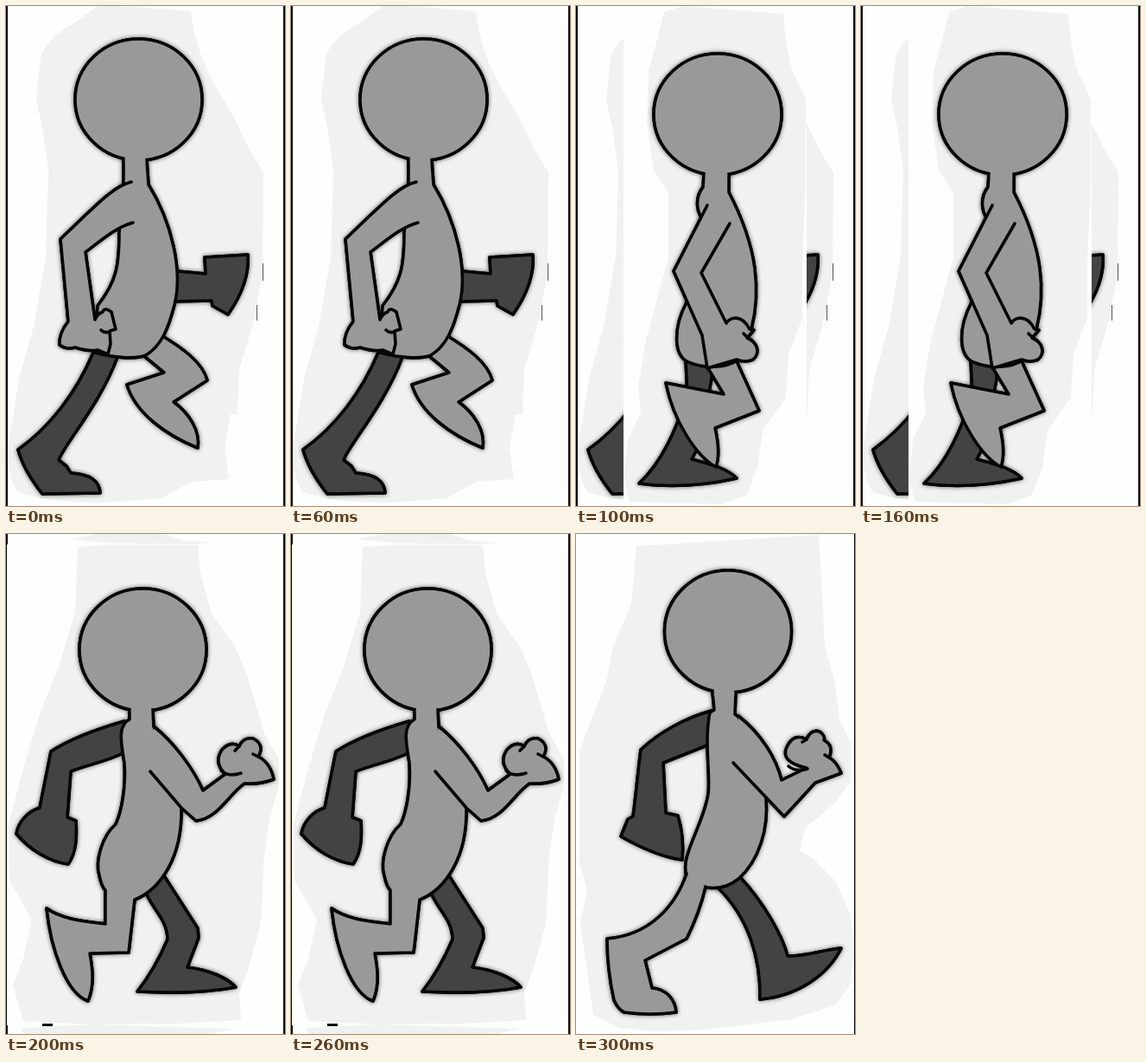
These frames come from a looping animation (323x577 px, 0.4 s). An HTML page with a canvas:

```html
<!DOCTYPE html>
<html lang="en">
<head>
<meta charset="utf-8">
<title>Walk cycle</title>
<style>
  html, body { margin: 0; width: 100%; height: 100%; overflow: hidden; background: #fdfffd; }
  canvas { display: block; width: 323px; height: 577px; }
</style>
</head>
<body>
<canvas id="stage"></canvas>
<script>
const W = 323, H = 577, STEP = 100;
const WHITE = '#fdfffd', PAPER = '#f0f2f0', GREY = '#989a97', DARK = '#424441', INK = '#050505';

const canvas = document.getElementById('stage');
const ctx = canvas.getContext('2d');
const ratio = window.devicePixelRatio || 1;
canvas.width = W * ratio;
canvas.height = H * ratio;
ctx.scale(ratio, ratio);

const part = (color, d) => ({ color, path: new Path2D(d) });
const grey = d => part(GREY, d);
const dark = d => part(DARK, d);

// Parts run from back to front; open path ends are the joints without a line.
const contact = {
  paper: new Path2D('M107 0L75 22Q45 40 40 60L35 108L42 140L49 190L46 290L32 370L15 430L4 500Q0 545 14 561Q60 576 130 572L180 568L215 549L258 546L253 510L260 471H268L270 420L285 370L297 310L298 192L283 168L262 125L238 85Q218 45 214 6L135 0Z'),
  head: [153.5, 108, 73.5, 70],
  neck: [136, 163, 177],
  parts: [
    dark('M198 306L231 309L230 290L280 287C282 312 271 336 257 356L239 346L238 340L196 341'),
    dark('M101 400C82 445 52 485 14 512Q20 535 42 563L109 562C108 546 95 540 75 539L70 531L61 524C66 508 110 458 129 405'),
    grey('M160 404L183 423L140 437C150 470 185 495 222 510C225 490 212 470 194 457L233 432C228 412 205 395 178 379'),
    grey('M136 177L136 203L131 262C131 300 128 318 106 346L103 400C125 406 150 408 162 403C180 392 188 372 195 345C205 305 192 250 165 206L163 178'),
    grey('M145 203C125 208 108 226 63 269L72 364Q61 378 62 391Q70 397 80 394Q95 399 106 397L118 402L121 390L120 375L127 373L122 353Q114 347 112 353Q106 355 103 362L92 284C112 269 128 255 147 250')
  ],
  lines: new Path2D('M120 376Q114 378 110 374'),
  extra() {
    ctx.fillStyle = '#555';
    ctx.fillRect(297, 297, 1, 20);
    ctx.fillRect(290, 345, 1, 18);
  }
};

const pass = {
  paper: new Path2D('M102 7L124 0L240 9Q243 55 252 78L266 108V200L262 300V360L246 402L243 452L216 490L210 532L198 564L170 575L62 572L56 545L60 500L75 470L72 440L80 390L96 330L107 290V215L90 190L82 135L84 75Q94 40 102 7Z'),
  head: [164, 125, 74, 70],
  neck: [148, 177, 194],
  parts: [
    dark('M127 409L129 450C115 490 100 526 73 551C110 556 150 553 186 545C175 533 152 528 134 523L143 506L157 430L158 410'),
    grey('M151 415L171 448L104 435C113 480 140 520 162 532C167 518 164 500 161 487L212 467L186 410'),
    grey('M148 194L147 209C138 220 139 236 146 245L128 342C113 370 112 403 130 411C150 419 174 418 188 408L203 373C214 330 211 280 177 215L177 194'),
    grey('M152 230L113 306L146 380L152 418L186 408Q196 412 205 408C214 400 210 388 198 383L206 374L201 373C192 355 178 359 174 366L145 308L178 251')
  ],
  lines: new Path2D('M194 378Q197 381 200 384')
};

const reach = {
  paper: new Path2D('M83 15L130 12L222 13L225 45L238 92L265 130L278 160L299 230L316 260V290L305 330L299 370L295 450L281 500L270 530L272 561L200 565L100 566L20 562L8 520L20 490L30 445L4 400L3 335L20 270L40 205L62 150L80 90ZM75 6L105 0H185L207 8L240 10L215 12L130 11ZM18 570L100 566L265 571L235 577H20Z'),
  head: [158.5, 133.5, 73.5, 70.5],
  neck: [143, 170, 203],
  parts: [
    dark('M137 216C102 226 72 238 52 251L39 316C25 320 14 333 12 346C28 365 50 378 72 381C82 367 82 348 81 331L71 327L75 274C95 266 118 262 135 253'),
    dark('M184 396L222 455L223 466L210 500C235 503 256 512 266 523C230 530 190 530 152 528Q172 503 187 468C187 446 172 436 163 416'),
    grey('M143 203L143 214C129 221 133 240 137 264C139 292 134 320 127 335C111 349 103 378 108 394Q111 408 115 411V450C92 447 65 445 47 432C52 480 70 530 95 539C103 520 100 500 97 484L142 483L149 422C179 410 204 373 203 317L171 222L170 203'),
    grey('M171 222C195 241 217 271 228 296L254 277Q240 264 250 249Q260 238 270 245Q275 234 286 236Q300 243 292 257Q306 264 310 283Q295 289 276 288C258 300 245 329 220 331L203 316L167 274')
  ],
  lines: new Path2D('M249 273Q257 281 272 276M270 245L265 250M292 257L286 254'),
  extra() {
    ctx.fillStyle = INK;
    ctx.fillRect(42, 565, 12, 3);
  }
};

const stride = {
  paper: new Path2D('M70 14L281 1L285 70L288 130L300 172L305 215L318 240V285L300 310L265 340L259 365L275 375L300 400L318 440L322 480L317 520L300 544L250 560L150 572L90 574L50 570L20 555L13 505L5 450L13 410L4 380V250L35 170L43 130L64 80Z'),
  head: [176, 112.5, 73.5, 70.5],
  neck: [158, 185, 183],
  parts: [
    dark('M157 204C127 212 96 229 75 249C71 280 69 305 66 326L60 329L52 349C75 362 100 373 123 376C125 355 122 338 118 325L104 322L101 264L154 243'),
    dark('M190 396C217 425 239 463 245 487C265 488 285 480 307 478C292 508 258 533 213 537C214 490 200 442 163 407'),
    grey('M158 183L160 203L155 206C148 240 156 280 153 300C148 335 120 372 128 394C141 412 170 413 188 398C212 377 223 340 220 305L188 211L184 208L185 183'),
    grey('M128 392C115 430 85 463 36 467C36 497 40 520 44 538Q49 549 56 552Q86 556 116 552C115 537 104 525 88 524L80 492L128 467Q143 437 150 407'),
    grey('M188 210C216 232 232 260 238 284L267 270Q236 263 244 246Q252 229 267 237Q272 225 282 228Q289 233 287 238Q299 244 293 258Q302 263 307 276L277 287L241 326L182 264')
  ],
  lines: new Path2D('M246 268Q254 275 268 271M267 237L262 240M293 258L288 255')
};

function figure({ head, neck, parts, lines }) {
  const skull = new Path2D();
  skull.ellipse(...head, 0, 0, Math.PI * 2);
  const all = [{ color: GREY, path: skull }, ...parts];

  ctx.strokeStyle = INK;
  ctx.lineWidth = 3.6;
  ctx.lineJoin = 'round';
  ctx.lineCap = 'round';

  // Soft dark fringe around the whole outline
  ctx.save();
  ctx.shadowColor = 'rgba(0, 0, 0, .7)';
  ctx.shadowBlur = 5 * ratio;
  for (const { path } of all) ctx.stroke(path);
  ctx.restore();

  for (const { color, path } of all) {
    ctx.fillStyle = color;
    ctx.fill(path);
    ctx.stroke(path);
  }
  ctx.stroke(lines);

  const [left, right, y] = neck;
  ctx.fillStyle = GREY;
  ctx.fillRect(left + 1.8, y - 5, right - left - 3.6, 9);
}

function scene(pose) {
  ctx.fillStyle = PAPER;
  ctx.fill(pose.paper);
  figure(pose);
  if (pose.extra) pose.extra();
}

function sides(left, right) {
  ctx.fillStyle = INK;
  ctx.fillRect(0, 0, left, H);
  ctx.fillRect(W - right, 0, right, H);
}

// The passing pose only repaints a central strip over the contact pose.
function passing() {
  scene(contact);
  ctx.save();
  ctx.beginPath();
  ctx.rect(55, 0, 212, H);
  ctx.clip();
  ctx.fillStyle = WHITE;
  ctx.fillRect(55, 0, 212, H);
  scene(pass);
  ctx.restore();
  sides(2, 2);
}

const poses = [
  () => { scene(contact); sides(2, 2); },
  passing,
  () => {
    scene(reach);
    sides(1, 2);
    ctx.fillRect(0, 0, 2, 12);
    ctx.fillRect(0, 567, 2, 10);
  },
  () => { scene(stride); sides(0, 1); }
];

const start = performance.now();
function draw() {
  const t = Math.max(0, performance.now() - start);
  ctx.fillStyle = WHITE;
  ctx.fillRect(0, 0, W, H);
  poses[Math.floor(t / STEP) % poses.length]();
  requestAnimationFrame(draw);
}
draw();
</script>
</body>
</html>
```
